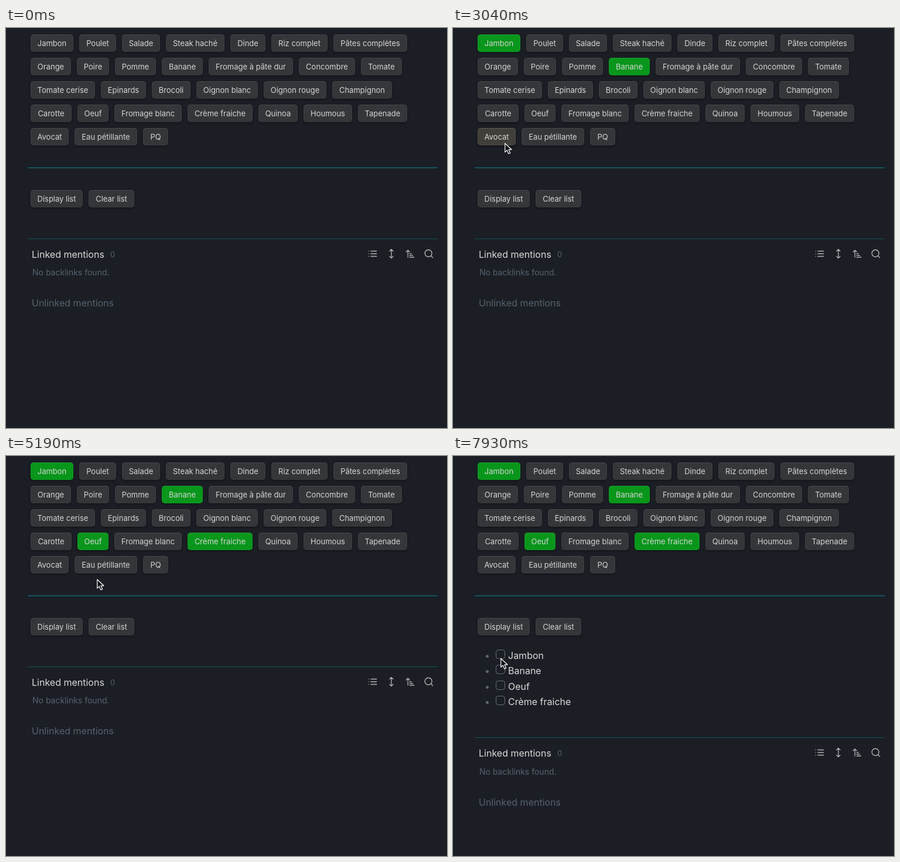
Recreate the animation shown at these times as an HTML page. Size 753 by 684 pixels, loop 8 s.

```html
<!DOCTYPE html>
<html lang="fr">
<head>
<meta charset="utf-8">
<title>Shopping list</title>
<style>
  html, body { margin: 0; width: 100%; height: 100%; overflow: hidden; background: #1b1e24; }
  body { position: relative; font: 16px/20px Inter, sans-serif; color: #dadada; cursor: default; }
  .btn, .txt, .rule, .box, .dot, svg { position: absolute; white-space: nowrap; }
  .btn {
    height: 30px; border-radius: 5px; background: #353639;
    font-size: 13px; line-height: 30px; text-align: center; color: #d6d6d6;
    box-shadow: inset 0 .5px .5px .5px rgba(255,255,255,.09), 0 2px 4px rgba(0,0,0,.15),
      0 1px 1.5px rgba(0,0,0,.1), 0 1px 2px rgba(0,0,0,.2);
  }
  .btn.hover {
    background: #403f3a;
    box-shadow: inset 0 .5px 1px .5px rgba(255,255,255,.16), 0 2px 3px rgba(0,0,0,.3),
      0 1px 1.5px rgba(0,0,0,.2), 0 1px 2px rgba(0,0,0,.4);
  }
  .btn.on { background: #08961b; }
  .rule { left: 37px; width: 700px; background: #12535f; }
  .muted { color: #566270; }
  .box { left: 73px; width: 14px; height: 14px; border: 1px solid #66717c; border-radius: 4.5px; }
  .dot { left: 56px; width: 5px; height: 5px; border-radius: 50%; background: #5f666e; }
  #foot { position: absolute; left: 0; top: 0; }
  .icon { top: 377px; fill: none; stroke: #b3b3b3; stroke-width: 1.75; stroke-linecap: round; stroke-linejoin: round; }
  #cursor { left: 0; top: 0; overflow: visible; }
</style>
</head>
<body>
<div class="rule" style="top:238px;height:2px"></div>
<div id="list"></div>
<div id="foot">
  <div class="rule" style="top:360px;height:1px"></div>
  <div class="txt" style="left:44px;top:377px">Linked mentions</div>
  <div class="txt muted" style="left:178px;top:377px;font-size:13px">0</div>
  <div class="txt muted" style="left:45px;top:408.2px;font-size:14px">No backlinks found.</div>
  <div class="txt muted" style="left:44px;top:460.2px">Unlinked mentions</div>
  <svg class="icon" style="left:617px" width="18" height="18" viewBox="0 0 24 24"><path d="M8 6h13M8 12h13M8 18h13M3 6h.01M3 12h.01M3 18h.01"/></svg>
  <svg class="icon" style="left:649px" width="18" height="18" viewBox="0 0 24 24"><path d="M8 18l4 4 4-4M8 6l4-4 4 4M12 2v20"/></svg>
  <svg class="icon" style="left:681px" width="18" height="18" viewBox="0 0 24 24"><path d="M3 8l4-4 4 4M7 4v16M11 12h4M11 16h7M11 20h10"/></svg>
  <svg class="icon" style="left:713px" width="18" height="18" viewBox="0 0 24 24"><circle cx="11" cy="11" r="8"/><path d="M21 21l-4.3-4.3"/></svg>
</div>
<svg id="cursor" width="14" height="20"><path d="M.8 1.2V16.2L4.3 12.9 6.9 18.9 9.7 17.7 7.1 11.8H12Z" fill="#121417" stroke="#fff" stroke-width="1.2" stroke-linejoin="round"/></svg>
<script>
const LOOP = 8000, LIST_AT = 6040;

// Each row: top, then "label width" pairs laid out left to right with a 10px gap.
const ROWS = [
  [11, 'Jambon 73|Poulet 63|Salade 65|Steak haché 100|Dinde 60|Riz complet 96|Pâtes complètes 126'],
  [51, 'Orange 69|Poire 55|Pomme 70|Banane 70|Fromage à pâte dur 144|Concombre 96|Tomate 70'],
  [91, 'Tomate cerise 110|Epinards 77|Brocoli 66|Oignon blanc 105|Oignon rouge 107|Champignon 102'],
  [131, 'Carotte 70|Oeuf 53|Fromage blanc 115|Crème fraiche 111|Quinoa 67|Houmous 83|Tapenade 84'],
  [171, 'Avocat 65|Eau pétillante 107|PQ 43'],
  [277, 'Display list 89|Clear list 78']
];
const PICKED = { 'Jambon': 1300, 'Banane': 2740, 'Oeuf': 3810, 'Crème fraiche': 4740 };

// Pointer moves: first step, last step, step count, end x, end y, button hovered early.
const START = [-3, 25];
const MOVES = [
  [520, 810, 5, 89, 23],
  [1000, 1110, 2, 98, 22],
  [1440, 1740, 4, 417, 71],
  [1930, 2330, 6, 323, 61],
  [2960, 3040, 2, 88, 196],
  [3150, 3410, 6, 132, 159],
  [3560, 3560, 1, 141, 151],
  [3960, 3960, 1, 147, 151, 'Fromage blanc'],
  [4070, 4370, 7, 372, 148],
  [4890, 5190, 7, 155, 210],
  [5300, 5480, 5, 93, 302],
  [5590, 5670, 2, 95, 293],
  [6070, 6190, 3, 60, 322],
  [7110, 7380, 4, 26, 328],
  [7460, 7890, 6, 81, 340],
  [7930, 7930, 1, 81, 345]
];

const $ = id => document.getElementById(id);
const list = $('list'), foot = $('foot'), cursor = $('cursor');

function add(parent, cls, css, text = '') {
  const el = document.createElement('div');
  el.className = cls;
  el.style.cssText = css;
  el.textContent = text;
  parent.append(el);
  return el;
}

const buttons = [];
for (const [y, row] of ROWS) {
  let x = 42;
  for (const item of row.split('|')) {
    const cut = item.lastIndexOf(' ');
    const name = item.slice(0, cut), w = +item.slice(cut + 1);
    const el = add(document.body, 'btn', `left:${x}px;top:${y}px;width:${w}px`, name);
    buttons.push({ el, name, x, y, w });
    x += w + 10;
  }
}
document.body.append(cursor);

Object.keys(PICKED).forEach((name, i) => {
  const y = Math.round(341 + i * 26.4);
  add(list, 'dot', `top:${y - 1}px`);
  add(list, 'box', `top:${y - 10}px`);
  add(list, 'txt', `left:94px;top:${y - 10}px`, name);
});

function pointer(t) {
  let [x, y] = START, early;
  for (const [t0, t1, n, ex, ey, name] of MOVES) {
    if (t < t0) break;
    const k = t >= t1 ? n : 1 + Math.floor((t - t0) / (t1 - t0) * (n - 1));
    x += (ex - x) * k / n;
    y += (ey - y) * k / n;
    early = name;
  }
  return { x: Math.round(x), y: Math.round(y), early };
}

function draw(t) {
  const p = pointer(t), shown = t >= MOVES[0][0];
  cursor.style.display = shown ? '' : 'none';
  cursor.style.transform = `translate(${p.x}px,${p.y}px)`;
  for (const b of buttons) {
    const inside = p.x >= b.x && p.x < b.x + b.w && p.y >= b.y && p.y < b.y + 30;
    const on = t >= PICKED[b.name];
    const hover = shown && !on && (p.early ? p.early === b.name : inside);
    b.el.classList.toggle('on', on);
    b.el.classList.toggle('hover', hover);
  }
  list.style.display = t >= LIST_AT ? '' : 'none';
  foot.style.top = t >= LIST_AT ? '121.4px' : '0';
}

const begin = performance.now();
function tick() {
  draw((performance.now() - begin) % LOOP);
  requestAnimationFrame(tick);
}
tick();
</script>
</body>
</html>
```
